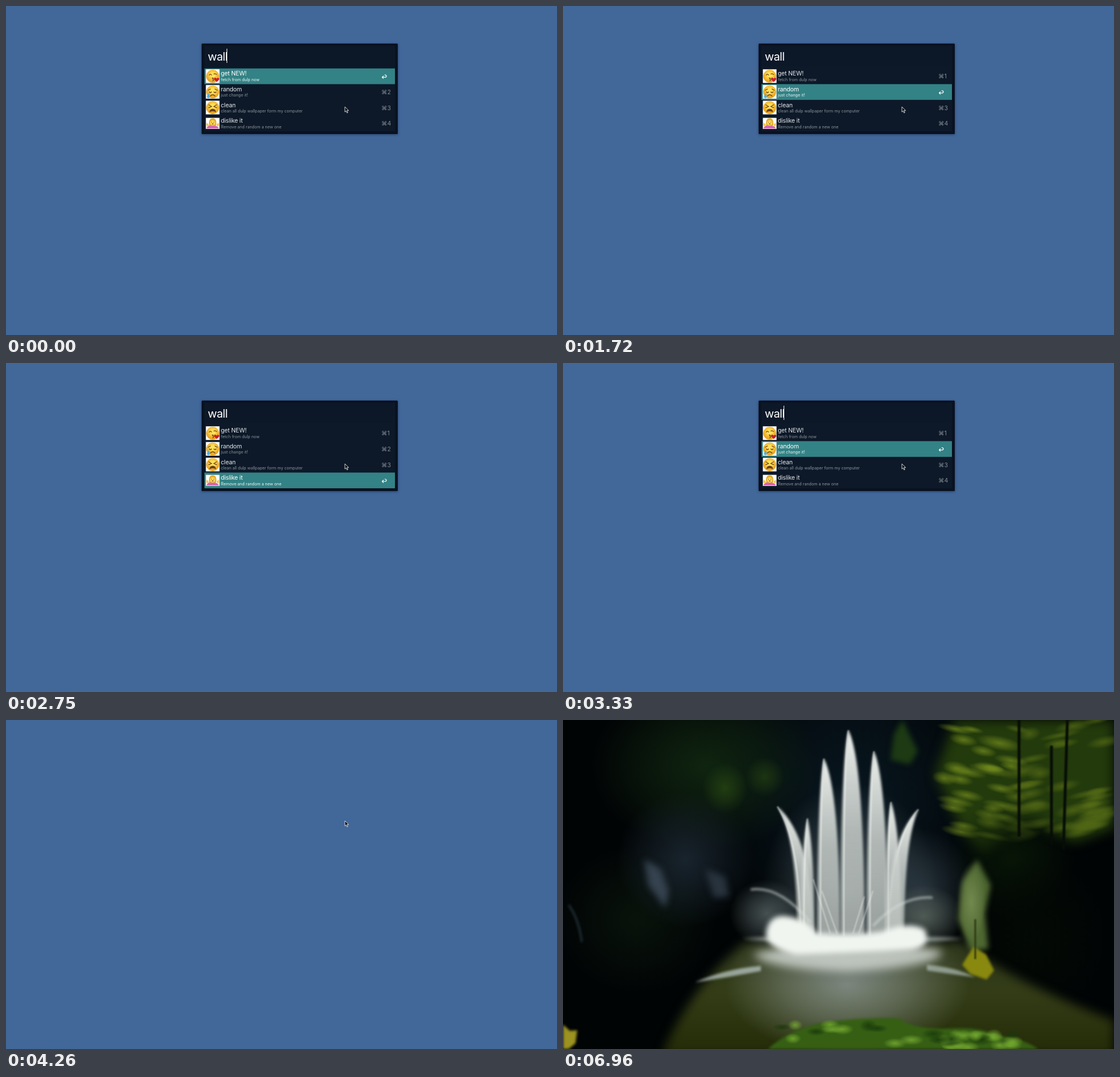
An HTML page with a canvas for the animation above (7.26 s loop, 969 by 578 pixels).

```html
<!DOCTYPE html>
<html lang="en">
<head>
<meta charset="utf-8">
<title>Wallpaper launcher</title>
<style>
  html, body { margin: 0; width: 100%; height: 100%; overflow: hidden; background: #426799; }
  canvas, svg { position: absolute; left: 0; top: 0; width: 100vw; height: 100vh; }
  text { font-family: Inter, "Liberation Sans", sans-serif; white-space: pre; }
  .query { font-size: 20px; letter-spacing: -.6px; fill: #fff; }
  .title { font-size: 10.6px; letter-spacing: -.2px; fill: #e2e6ea; }
  .note { font-size: 7.15px; fill: #8d949d; }
  .key { font-size: 10.5px; fill: #838b95; }
  .enter { fill: none; stroke: #fff; stroke-width: 1.2; }
  .bar { fill: #338285; }
  .bar, .enter { visibility: hidden; }
  .on .bar, .on .enter { visibility: inherit; }
  .on .key { visibility: hidden; }
  .on .title { fill: #fff; }
  .on .note { fill: #eef6f6; }
  .ink { fill: none; stroke: #68401a; stroke-width: 1.2; stroke-linecap: round; }
</style>
</head>
<body>
<canvas id="photo" width="969" height="578"></canvas>
<svg viewBox="0 0 969 578">
  <defs>
    <radialGradient id="skin" cy=".4">
      <stop offset=".3" stop-color="#ffe15a"/><stop offset="1" stop-color="#eba521"/>
    </radialGradient>
    <filter id="soft" x="-10%" y="-10%" width="120%" height="130%"><feGaussianBlur stdDeviation="2"/></filter>
  </defs>
  <g id="panel">
    <rect x="344" y="67" width="345" height="159" fill="#14294a" opacity=".6" filter="url(#soft)"/>
    <rect x="344" y="66" width="345" height="159" rx="1.5" fill="#091221"/>
    <rect x="349" y="70" width="335" height="150" fill="#0d1928"/>
    <rect x="351" y="70" width="330" height="36" fill="#0c1727"/>
    <text class="query" x="354.7" y="95.5">wall</text>
    <rect id="caret" x="388" y="75" width="1" height="25" fill="#fff"/>
    <g id="rows"></g>
  </g>
  <path id="cursor" d="M0 0V9.2L2.1 7.3 3.7 10.8 5.2 10.1 3.7 6.7H6.6Z" fill="#080a0d" stroke="#e6eaee" stroke-width=".9"/>
</svg>
<script>
const LOOP = 7260;
const $ = id => document.getElementById(id);

// Launcher rows
const face = '<circle r="11.3" fill="url(#skin)"/>';
const icons = [
  face + `<path class="ink" d="M-6-2q2-3 4 0M2-4q3-1 5 1M-1 3q4 0 1 2 4 1 0 3"/>
    <path d="M7 10L2.5 5.5Q2 2 5 2.500L7 4Q10 1 11.500 4 12 6 7 10Z" fill="#c91f2b"/>`,
  face + `<path class="ink" d="M-8-3l4-2M8-3l-4-2M-6 0q2 2 4 0M2 0q2 2 4 0M-4 7q4-4 8 0"/>
    <path d="M-7 2Q-13 10-8 11-3 11-7 2Z" fill="#54aee0"/>`,
  face + `<path class="ink" d="M-7-5l5 3-5 2M7-5l-5 3 5 2"/>
    <path d="M-6 8Q-5 2 0 2T6 8Q0 5-6 8Z" fill="#69401b"/>`,
  `<path d="M-11 9Q-9 2 0 3T11 9Z" fill="#d864b4"/>
    <path d="M-6 4Q-8-9 0-9T6 4Z" fill="#e0ad2c"/><circle cy="-1" r="4.500" fill="#ffd95c"/>
    <path class="ink" d="M-2-2h.1M2-2h.1M-1 1h2"/>
    <path d="M-11-1l4 2-1 5-3-2ZM11-1L7 1 8 6l3-2Z" fill="#f3c54e"/>`
];
const items = [
  ['get NEW!', 'fetch from dulp now'],
  ['random', 'just change it!'],
  ['clean', 'clean all dulp wallpaper form my computer'],
  ['dislike it', 'Remove and random a new one']
];
$('rows').innerHTML = items.map(([title, note], i) => {
  const short = i === 3;
  return `<g transform="translate(0 ${109.7 + 27.6 * i})">
    <rect class="bar" x="349" width="335" height="27.6"/>
    <rect x="351.500" y="${short ? 4 : 1.5}" width="24" height="${short ? 19.5 : 24}" fill="#fff"/>
    <g transform="translate(363.5 13.7)">${icons[i]}</g>
    <text class="title" x="377.7" y="12.7">${title}</text>
    <text class="note" x="378" y="22.1">${note}</text>
    <text class="key" x="660" y="17.700">⌘${i + 1}</text>
    <path class="enter" d="M664 13l-2.500 2.500 2.500 2.500M661.700 15.500h5q2.200 0 2.200-2t-2.200-2h-1"/>
  </g>`;
}).join('');
const rows = [...$('rows').children];

// Fountain scene
const c = $('photo').getContext('2d');
let seed = 7;
const rand = (lo, hi) => {
  seed = seed * 16807 % 2147483647;
  return lo + (hi - lo) * seed / 2147483647;
};
function glow(x, y, rx, ry, rgb, alpha = 1) {
  const g = c.createRadialGradient(0, 0, 0, 0, 0, 1);
  [1, .55, 0].forEach((k, i) => g.addColorStop(i / 2, `rgba(${rgb},${alpha * k})`));
  c.save();
  c.translate(x, y);
  c.scale(rx, ry);
  c.fillStyle = g;
  c.fillRect(-1, -1, 2, 2);
  c.restore();
}
function shape(d, fill, blur = 0) {
  c.filter = blur ? `blur(${blur}px)` : 'none';
  c.fillStyle = fill;
  c.fill(new Path2D(d));
  c.filter = 'none';
}
function line(d, color, width, blur = 0) {
  c.filter = blur ? `blur(${blur}px)` : 'none';
  c.strokeStyle = color;
  c.lineWidth = width;
  c.stroke(new Path2D(d));
  c.filter = 'none';
}
function fade(y0, y1, ...colors) {
  const g = c.createLinearGradient(0, y0, 0, y1);
  colors.forEach((color, i) => g.addColorStop(i / (colors.length - 1), color));
  return g;
}
function jet(x, y, left, right) {
  const base = 380;
  shape(`M${x} ${y}Q${right} ${y + 55} ${right} ${base}H${left}Q${left} ${y + 55} ${x} ${y}Z`,
    fade(y, base, '#eef2ee', 'rgba(200,206,202,.85)', 'rgba(188,195,190,.75)'), 2);
  line(`M${x} ${y}Q${left + 5} ${y + 60} ${left + 6} ${base}`, 'rgba(250,253,250,.55)', 2.5, 1);
}
function drawScene() {
  c.fillStyle = '#010405';
  c.fillRect(0, 0, 969, 578);

  // Woods and cliff
  glow(510, 130, 280, 290, '8,22,31');
  glow(250, 80, 200, 150, '17,40,17', .9);
  glow(285, 120, 40, 45, '48,82,20', .6);
  glow(355, 100, 35, 35, '40,70,18', .6);
  glow(130, 350, 140, 130, '9,20,11', .9);
  glow(215, 245, 120, 120, '27,39,49', .9);
  shape('M143 245L172 262 186 300 180 330 150 290Z', '#35424f', 6);
  shape('M250 262L285 275 292 310 265 312Z', '#28333d', 6);
  line('M10 325Q28 350 33 390', '#26343c', 3, 2);
  shape('M597 0L624 55 610 78 576 70 582 25Z', '#1d3a14', 5);

  // Sunlit trees
  shape('M969 0H690L655 95 700 190 740 235 820 180 900 215 969 190Z', '#233a0c', 10);
  for (let i = 0; i < 70; i++) {
    const y = rand(0, 205), x = rand(660 + Math.abs(y - 100) * .35, 960);
    c.save();
    c.translate(x, y);
    c.rotate(x < 800 ? .2 : -.2);
    glow(0, 0, rand(20, 42), rand(6, 13), x < 790 ? '118,143,30' : '86,108,22', .7);
    c.restore();
  }
  glow(790, 245, 110, 110, '8,22,6', .95);
  line('M887 0L880 228M802 0V205M859 45V220', '#070d07', 5, 1);
  glow(830, 380, 130, 140, '3,9,4');

  // Pond
  shape('M178 578Q225 470 320 390H700Q790 460 969 528V590H178Z',
    fade(385, 578, '#30391e', '#333c16', '#242c08'), 9);
  glow(500, 465, 215, 125, '138,148,143', .85);
  shape('M232 461Q285 437 348 432V441Q290 452 232 461Z', 'rgba(185,198,194,.75)', 2);
  shape('M725 452Q690 434 640 430V440Q680 446 725 452Z', 'rgba(185,198,194,.65)', 2);
  shape('M315 384Q510 374 704 384 510 401 315 384Z', 'rgba(190,199,194,.9)', 3);

  // Fountain
  glow(505, 300, 155, 190, '105,119,126', .6);
  glow(630, 300, 90, 110, '52,66,76', .7);
  glow(358, 340, 65, 60, '105,119,120', .65);
  glow(635, 345, 70, 55, '105,117,105', .65);
  jet(377, 152, 412, 440);
  jet(625, 157, 568, 600);
  jet(430, 173, 418, 442);
  jet(577, 144, 566, 595);
  jet(459, 68, 447, 487);
  jet(547, 55, 534, 571);
  jet(502, 18, 488, 530);
  line('M330 298Q380 290 435 355M545 362Q595 308 650 312', 'rgba(215,222,218,.6)', 4, 2);
  line('M470 375L440 280M482 375L455 300M520 375L545 300M510 375L530 310', 'rgba(245,248,245,.5)', 2, 1);
  shape('M335 410Q500 375 665 405 675 432 500 442 345 435 335 410Z', 'rgba(205,211,205,.85)', 8);
  shape('M357 374Q362 340 395 345T445 374Q505 380 560 372 610 352 636 368 650 398 612 404 500 408 410 412 355 400 357 374Z',
    '#f0f5f0', 5);

  // Bank and foreground
  shape('M728 245L752 290 742 340 748 402 716 406 695 350 702 285Z', '#4e6731', 5);
  glow(718, 320, 25, 70, '128,150,90', .7);
  shape('M722 398L744 412 758 440 745 456 716 446 702 430Z', '#89880f', 2);
  line('M725 350V420', '#2e3a14', 3, 1);
  shape('M360 578Q405 538 470 530T590 524Q620 545 680 542T760 555Q805 557 836 578Z', '#365f14', 2);
  for (let i = 0; i < 34; i++) {
    const x = rand(385, 810), top = x < 610 ? 530 : 547;
    glow(x, rand(top + 4, 576), rand(12, 24), rand(6, 12), i % 3 ? '116,168,48' : '24,56,10', .85);
  }
  shape('M0 535L12 546 25 545 22 568 10 578H0Z', '#9b9220', 2);
}
drawScene();

// Each step is [start in ms, value]
const selection = [[0, 0], [1420, 1], [2020, 2], [2460, 3], [3040, 2], [3190, 1], [3630, 0]];
const caret = [[0, 1], [530, 0], [1120, 1], [1720, 0], [2310, 1], [2750, 0], [3330, 1], [3920, 0]];
const pointer = [[0, [596, 177]], [6340, [608.5, 200.5]], [6670, [742, 372]], [6820, [901, 563]], [6960, null]];
const at = (steps, t) => steps.filter(([start]) => t >= start).pop()[1];
const show = (el, visible) => el.style.visibility = visible ? 'visible' : 'hidden';

function render(now) {
  const t = now % LOOP, open = t < 4260;
  const chosen = at(selection, t), spot = at(pointer, t);
  show($('photo'), t >= 5740);
  show($('panel'), open);
  show($('caret'), open && at(caret, t));
  rows.forEach((row, i) => row.classList.toggle('on', i === chosen));
  show($('cursor'), spot);
  if (spot) $('cursor').setAttribute('transform', `translate(${spot})`);
}

const begin = performance.now();
(function tick() {
  render(performance.now() - begin);
  requestAnimationFrame(tick);
})();
</script>
</body>
</html>
```
